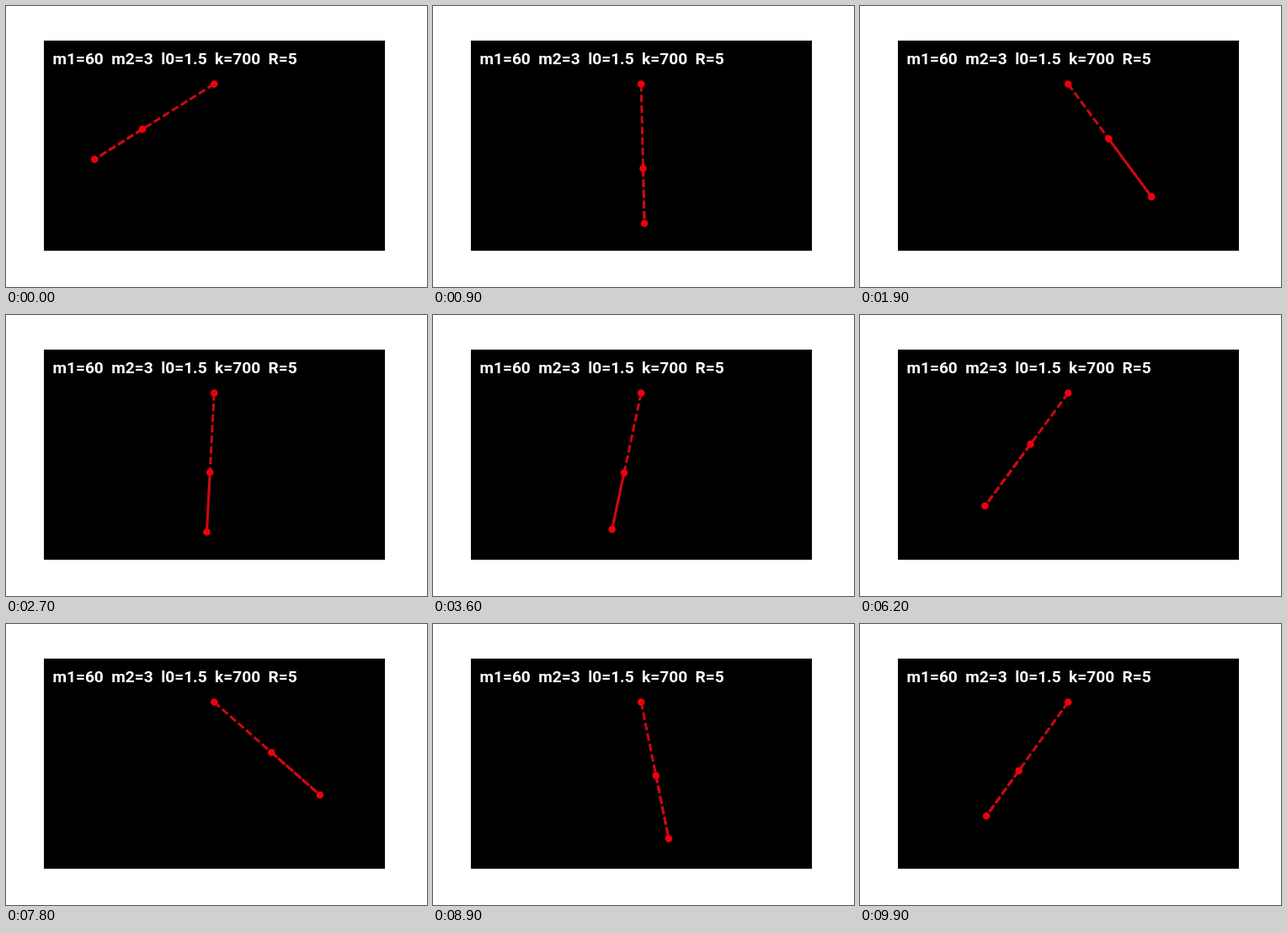
An HTML page with a canvas that plays this animation: 500x333 px, repeating every 10000 ms.

```html
<!DOCTYPE html>
<html lang="en">
<head>
<meta charset="utf-8">
<title>Pendulum with a sliding spring mass</title>
<style>
  html, body { margin: 0; width: 100%; height: 100%; overflow: hidden; background: #fff; }
  canvas { display: block; }
</style>
</head>
<body>
<canvas id="stage" width="500" height="333"></canvas>
<script>
const ctx = document.getElementById('stage').getContext('2d');

// Bead m1 slides on a rod of length R with m2 at its end; a spring ties it to the pivot.
const m1 = 60, m2 = 3, k = 700, R = 5, rest = 2, g = 9.81;
const FRAMES = 100, FRAME_MS = 100, SUBSTEPS = 20;

// State: bead distance, angle, radial speed, angular speed.
function slope([r, a, vr, w]) {
  const inertia = m1 * r * r + m2 * R * R;
  const torque = -(m1 * r + m2 * R) * g * Math.sin(a) - 2 * m1 * r * vr * w;
  return [vr, w, r * w * w + g * Math.cos(a) - k / m1 * (r - rest), torque / inertia];
}

const add = (s, d, h) => s.map((v, i) => v + h * d[i]);

function step(s, h) {
  const a = slope(s);
  const b = slope(add(s, a, h / 2));
  const c = slope(add(s, b, h / 2));
  const d = slope(add(s, c, h));
  return s.map((v, i) => v + h / 6 * (a[i] + 2 * b[i] + 2 * c[i] + d[i]));
}

const poses = [];
for (let n = 0, s = [3, -1, 0, 0]; n < FRAMES; n++) {
  poses.push(s);
  for (let i = 0; i < SUBSTEPS; i++) s = step(s, FRAME_MS / 1000 / SUBSTEPS);
}

const point = (r, a) => [247.2 + 33.75 * r * Math.sin(a), 92.5 + 33 * r * Math.cos(a)];

function line(from, to) {
  ctx.beginPath();
  ctx.moveTo(...from);
  ctx.lineTo(...to);
  ctx.stroke();
}

function draw([r, a]) {
  ctx.fillStyle = '#fff';
  ctx.fillRect(0, 0, 500, 333);
  ctx.fillStyle = '#000';
  ctx.fillRect(45, 41, 405, 249);

  ctx.fillStyle = '#fff';
  ctx.font = '700 19.1px Roboto, sans-serif';
  ctx.fillText('m1=60  m2=3  l0=1.5  k=700  R=5', 55.5, 69);

  // Each dashed line starts its own pattern, so the two fill each other's gaps below the bead.
  const pivot = point(0, a), end = point(R, a), bead = point(r, a);
  ctx.strokeStyle = '#cc0812';
  ctx.lineWidth = 3;
  ctx.setLineDash([9, 3.6]);
  line(pivot, end);
  line(bead, end);

  ctx.fillStyle = '#ee000c';
  for (const p of [pivot, end, bead]) {
    ctx.beginPath();
    ctx.arc(...p, 4.3, 0, 2 * Math.PI);
    ctx.fill();
  }
}

function tick() {
  draw(poses[Math.floor(performance.now() / FRAME_MS) % FRAMES]);
  requestAnimationFrame(tick);
}
tick();
</script>
</body>
</html>
```
